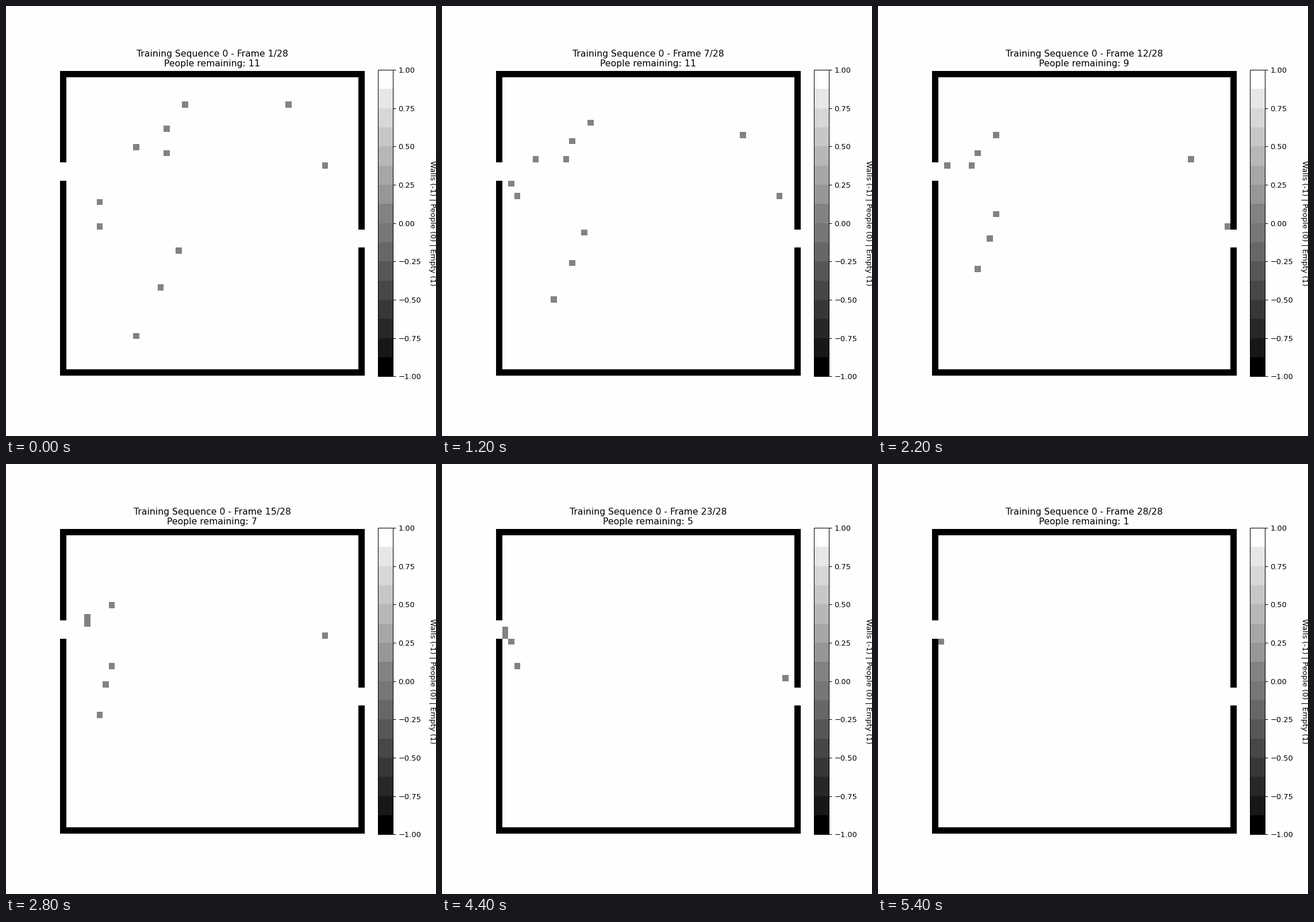
Write a matplotlib script that moves like this. It is 748 by 748 pixels and loops after 5600 ms.

```python
import numpy as np
import matplotlib.pyplot as plt
from matplotlib.animation import FuncAnimation
from matplotlib.colors import ListedColormap

STEPS, GRID, SPEED = 28, 50, 1.01
WALL, PERSON, EMPTY = -1, 0, 1
PAPER = "#fefefe"

# Starting points and doorways as (x, y) in cells
STARTS = np.array([
    (20.65, 5.56), (37.1, 5.25), (17.79, 9.15), (12.7, 12.4),
    (17.97, 13.72), (43.4, 15.5), (6.9, 21.7), (6.95, 25.0),
    (19.75, 29.97), (16.6, 35.7), (12.6, 43.0),
])
DOORS = np.array([(0, 16.57), (49.3, 27.2)])

# Everyone heads straight for the nearest door
paths = DOORS[None] - STARTS[:, None]
lengths = np.linalg.norm(paths, axis=2)
nearest = lengths.argmin(axis=1)
who = np.arange(len(STARTS))
path, length = paths[who, nearest], lengths[who, nearest]
velocity = SPEED * path / length[:, None]


def empty_room():
    room = np.full((GRID, GRID), EMPTY)
    room[[0, -1]] = room[:, [0, -1]] = WALL
    room[15:18, 0] = room[26:29, -1] = EMPTY
    return room


def room_at(step):
    room = empty_room()
    inside = length - SPEED * step > 0.5
    cells = np.floor(STARTS + velocity * step).astype(int)[inside]
    cols, rows = np.clip(cells, 1, GRID - 2).T
    room[rows, cols] = PERSON
    return room, inside.sum()


# Sixteen greys; the bands of walls, people and floor sit at their own tone
tones = 16 * np.arange(16) + 7
tones[[0, 8, 15]] = 0, 130, 254
greys = ListedColormap(np.repeat(tones[:, None] / 255, 3, axis=1))

plt.rcParams["font.family"] = "DejaVu Sans"
fig, ax = plt.subplots(figsize=(8, 8), dpi=93.5, facecolor=PAPER)
image = ax.imshow(empty_room(), cmap=greys, vmin=-1, vmax=1,
                  interpolation="nearest")
ax.axis("off")
title = ax.set_title("")
bar = fig.colorbar(image, ax=ax, fraction=0.046, pad=0.04)
bar.set_label("Walls (-1) | People (0) | Empty (1)", rotation=270, labelpad=20)


def update(step):
    room, count = room_at(step)
    image.set_data(room)
    title.set_text(f"Training Sequence 0 - Frame {step + 1}/{STEPS}\n"
                   f"People remaining: {count}")
    return image, title


anim = FuncAnimation(fig, update, frames=STEPS, interval=200, repeat=True,
                     repeat_delay=0, blit=False)
plt.show()
```
